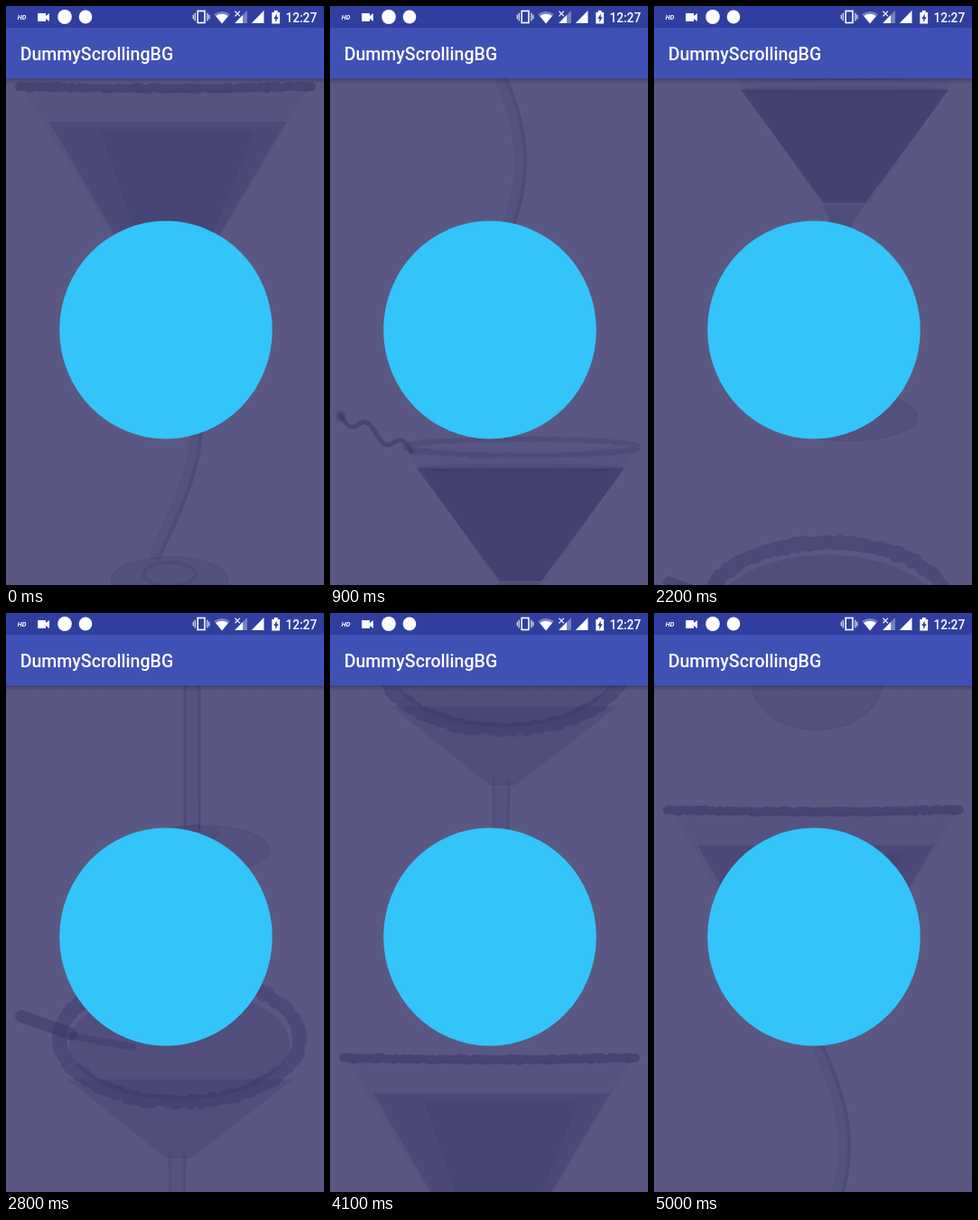
Animation of 352 by 640 pixels, one loop 5.1 s. Source, as an HTML page with a canvas:

```html
<!DOCTYPE html>
<html lang="en">
<head>
<meta charset="utf-8">
<title>Scrolling background</title>
<style>
  html, body { margin: 0; width: 100%; height: 100%; overflow: hidden; background: #5a5883; }
  canvas { display: block; }
</style>
</head>
<body>
<canvas id="stage" width="352" height="640"></canvas>
<script>
const ctx = document.getElementById('stage').getContext('2d');
const WIDTH = 352, HEIGHT = 640, SCREEN_DP = 360;
const LOOP = 5100, STEP = 100, STRIP = 1714;
const WHITE = '#fff', STATUS = '#303f9f', BAR = '#3f51b5';
const TAU = Math.PI * 2;
const ink = alpha => `rgba(48,43,96,${alpha})`;
const random = seed => {
  const n = Math.sin(seed * 12.9898) * 43758.5453;
  return n - Math.floor(n);
};

// Steady scroll that slows slightly towards the end of the loop.
const scrollAt = t => 0.3215 * t - 22 * (t / 5000) ** 6;

function ellipse(x, y, rx, ry, fill) {
  ctx.beginPath();
  ctx.ellipse(x, y, rx, ry, 0, 0, TAU);
  ctx.fillStyle = fill;
  ctx.fill();
}

// Tapered shape between two heights, given half widths and centres.
function cone(x0, y0, half0, x1, y1, half1, fill) {
  ctx.beginPath();
  ctx.moveTo(x0 - half0, y0);
  ctx.lineTo(x0 + half0, y0);
  ctx.lineTo(x1 + half1, y1);
  ctx.lineTo(x1 - half1, y1);
  ctx.fillStyle = fill;
  ctx.fill();
}

function curve(point, color, width) {
  ctx.beginPath();
  for (let i = 0; i <= 40; i++) ctx.lineTo(...point(i / 40));
  ctx.strokeStyle = color;
  ctx.lineWidth = width;
  ctx.lineCap = ctx.lineJoin = 'round';
  ctx.stroke();
}

const line = (x0, y0, x1, y1, color, width) =>
  curve(u => [x0 + (x1 - x0) * u, y0 + (y1 - y0) * u], color, width);

const around = (cx, cy, rx, ry) => u => [cx + rx * Math.cos(u * TAU), cy + ry * Math.sin(u * TAU)];

// Sugar crust: overlapping grains in one path, so the tone stays even.
function crust(place, grain, color) {
  ctx.beginPath();
  for (let i = 0; i < 300; i++) {
    const [x, y] = place(i / 300);
    const r = grain * (0.75 + 0.4 * random(i));
    const dy = grain * (random(i + 500) - 0.5) * 0.5;
    ctx.moveTo(x + r, y + dy);
    ctx.arc(x, y + dy, r, 0, TAU);
  }
  ctx.fillStyle = color;
  ctx.fill();
}

function base(x, y, rx, ry) {
  ellipse(x, y, rx, ry, ink(0.14));
  curve(around(x, y, rx, ry), ink(0.1), 2);
}

function curlyGlass() {
  cone(212, 0, 128, 212, 150, 26, ink(0.1));
  cone(211, 23, 115, 211, 148, 23, ink(0.46));
  ellipse(211, 23, 115, 5, ink(0.14));
  cone(210, 150, 23, 207, 178, 8, ink(0.26));
  cone(206, 175, 8, 206, 365, 9, ink(0.1));
  for (const side of [-8, 8]) line(206 + side, 175, 206 + side, 365, ink(0.25), 3);
  base(215, 384, 77, 27);
  ellipse(209, 366, 28, 9, ink(0.12));
  crust(around(212, 0, 129, 9), 3, ink(0.24));
  curve(u => [12 + 78 * u, 40 * u - 35 + 7 * Math.sin(u * 2 * TAU)], ink(0.42), 5);
  ellipse(12, -35, 6, 6, ink(0.3));
}

function wideGlass() {
  cone(193, 45, 125, 191, 132, 14, ink(0.2));
  cone(190, 130, 10, 189, 245, 7, ink(0.1));
  for (const side of [-9, 8]) line(190 + side, 125, 189 + side * 0.8, 245, ink(0.16), 3);
  base(180, 290, 73, 55);
  ellipse(187, 268, 33, 19, ink(0.09));
  ellipse(192, 6, 122, 62, ink(0.2));
  crust(around(192, 0, 133, 70), 7.5, ink(0.32));
  line(17, -25, 72, -5, ink(0.38), 14);
  line(72, -3, 140, 9, ink(0.26), 8);
}

function flatGlass() {
  const stem = shift => u => [180 + shift + 36 * Math.sin(u * 1.08 * Math.PI), 248 + 270 * u];
  cone(177, 4, 157, 178, 252, 8, ink(0.1));
  cone(179, 40, 131, 178, 250, 8, ink(0.26));
  cone(190, 50, 85, 184, 230, 18, ink(0.14));
  curve(stem(-5), ink(0.13), 14);
  curve(stem(0), ink(0.17), 4);
  base(181, 546, 65, 25);
  curve(around(181, 540, 29, 13), ink(0.18), 4);
  crust(u => [14 + 325 * u, 1 + 2 * Math.sin(u * Math.PI)], 4.5, ink(0.43));
}

const GLASSES = [[777, curlyGlass], [1370, wideGlass], [1802, flatGlass]];

function background(scroll) {
  ctx.fillStyle = '#5a5883';
  ctx.fillRect(0, 0, WIDTH, HEIGHT);
  for (const wrap of [0, STRIP]) {
    for (const [top, draw] of GLASSES) {
      ctx.save();
      ctx.translate(0, top - scroll - wrap);
      draw();
      ctx.restore();
    }
  }
}

function text(value, x, y, font, align = 'left') {
  ctx.fillStyle = WHITE;
  ctx.textAlign = align;
  ctx.font = `${font} Roboto, sans-serif`;
  ctx.fillText(value, x, y);
}

function shape(path, fill) {
  ctx.fillStyle = fill;
  ctx.fill(new Path2D(path));
}

function signal(x, size, fill) {
  shape(`M${x} 19 h${size} v${-size} Z`, fill);
}

function vibrate(x) {
  ctx.strokeStyle = WHITE;
  ctx.lineWidth = 1.6;
  ctx.strokeRect(x - 4, 5.5, 8, 13);
  for (const side of [-1, 1]) {
    line(x + side * 7, 8, x + side * 7, 16, WHITE, 1.1);
    line(x + side * 9, 10, x + side * 9, 14, WHITE, 1.1);
  }
}

function statusBar() {
  const dim = 'rgba(255,255,255,.35)';
  ctx.fillStyle = STATUS;
  ctx.fillRect(0, 0, SCREEN_DP, 24);
  text('HD', 13, 15, 'italic 700 7.5px');
  shape('M36 8 h9 v3 l4 -3 v9 l-4 -3 v3 h-9 Z', WHITE);
  ellipse(66.5, 12, 8, 8, WHITE);
  ellipse(90, 12, 7.5, 7.5, WHITE);
  vibrate(221);
  shape('M235.5 9 Q244.5 3 253.5 9 L244.5 19.5 Z', dim);
  shape('M237.5 11 Q244.5 6.5 251.5 11 L244.5 19.5 Z', WHITE);
  signal(259, 14, dim);
  signal(259, 9, WHITE);
  for (const side of [-2.5, 2.5]) line(262 - side, 6, 262 + side, 11, WHITE, 1.1);
  signal(278, 14, WHITE);
  shape('M301 7 h2.5 v-2 h4 v2 h2.5 v12.5 h-9 Z', WHITE);
  shape('M306.5 8.5 l-3.5 5.5 h2 v4 l3.5 -5.7 h-2 Z', STATUS);
  text('12:27', 352, 18, '500 14px', 'right');
}

function header() {
  const shadow = ctx.createLinearGradient(0, 80, 0, 86);
  shadow.addColorStop(0, 'rgba(25,22,60,.35)');
  shadow.addColorStop(1, 'rgba(25,22,60,0)');
  ctx.fillStyle = shadow;
  ctx.fillRect(0, 80, SCREEN_DP, 6);
  ctx.fillStyle = BAR;
  ctx.fillRect(0, 24, SCREEN_DP, 56);
  text('DummyScrollingBG', 16, 60, '500 20px');
  statusBar();
}

function frame() {
  const t = Math.floor(performance.now() % LOOP / STEP) * STEP;
  background(scrollAt(t));
  // The interface is laid out on a screen 360 units wide.
  ctx.save();
  ctx.scale(WIDTH / SCREEN_DP, 1);
  ellipse(181, 358, 120.5, 120.5, '#33c4f9');
  header();
  ctx.restore();
  requestAnimationFrame(frame);
}
frame();
</script>
</body>
</html>
```
